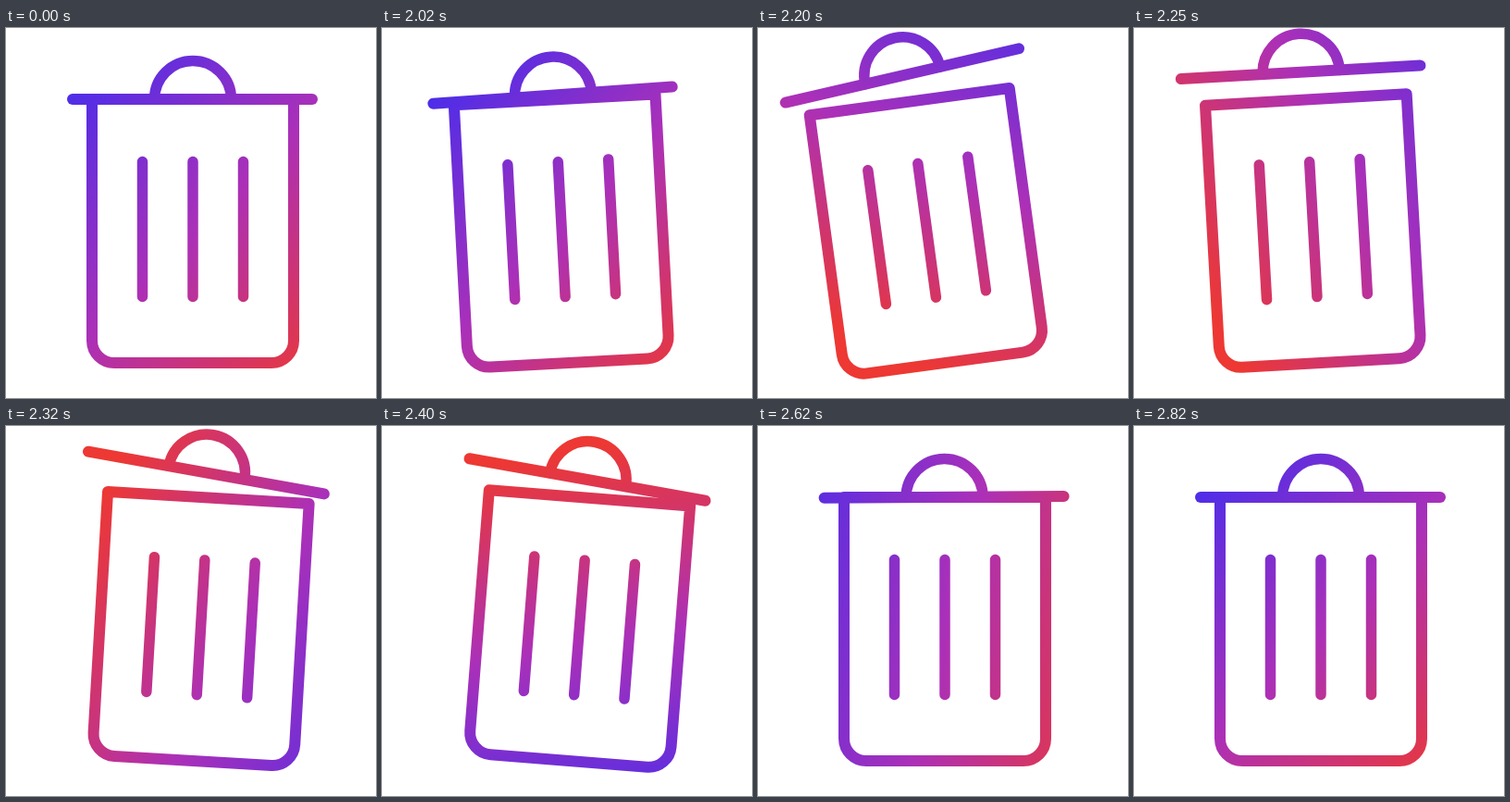
Animation of 400x400 px, one loop 2850 ms. Source, as an HTML page:

```html
<!DOCTYPE html>
<html lang="en">
<head>
<meta charset="utf-8">
<title>Bin</title>
<style>
  html, body { margin: 0; width: 100%; height: 100%; overflow: hidden; background: #fff; }
  svg { display: block; width: 100vw; height: 100vh; }
  mask { fill: none; stroke: #fff; stroke-width: 12; stroke-linecap: round; stroke-linejoin: round; }
  .thin { stroke-width: 11.5; }
</style>
</head>
<body>
<svg viewBox="0 0 400 400">
  <defs>
    <linearGradient id="paint" gradientUnits="userSpaceOnUse" x1="-210" y1="0" x2="210" y2="0">
      <stop offset="0" stop-color="#4a2dea"/>
      <stop offset=".5" stop-color="#ab30b8"/>
      <stop offset="1" stop-color="#ed3833"/>
    </linearGradient>
    <mask id="bin" maskUnits="userSpaceOnUse" x="0" y="0" width="400" height="400">
      <g id="body">
        <path d="M93 77H311V338A24 24 0 0 1 287 362H117A24 24 0 0 1 93 338Z"/>
        <path class="thin" d="M147.5 144.5V290.5M202 144.5V290.5M256.5 144.5V290.5"/>
        <g id="lid">
          <path d="M72 77H331"/>
          <path class="thin" d="M160.5 77A41.5 41.5 0 0 1 243.5 77"/>
        </g>
      </g>
    </mask>
  </defs>
  <rect width="400" height="400" fill="url(#paint)" mask="url(#bin)"/>
</svg>
<script>
  const LOOP = 2850, START = 2000;
  const [body, lid, paint] = ["body", "lid", "paint"].map(id => document.getElementById(id));

  const easeOut = s => Math.sin(s * Math.PI / 2);
  const easeInOut = s => (1 - Math.cos(s * Math.PI)) / 2;
  const earlyInOut = s => easeInOut(s ** 0.85);

  // 40 steps per second, start times cut to 10 ms
  const stepTime = ms => 25 * (Math.ceil((Math.floor(ms / 10) + 1) / 2.5) - 1);

  function draw(ms) {
    const t = stepTime(ms % LOOP) - START;
    // Goes from 0 to 1 between two times after START
    const ramp = (from, to, ease = easeInOut) =>
      ease(Math.min(1, Math.max(0, (t - from) / (to - from))));

    // The bin leans left, swings right and settles
    const tilt = -10 * ramp(0, 125, easeOut) + 15 * ramp(140, 375) - 5 * ramp(375, 500);

    // The lid jumps, rocks and drops back
    const lift = -30 * (ramp(0, 240, easeOut) - ramp(240, 640));
    const slide = -3.5 * (ramp(0, 100, easeOut) - ramp(500, 660));
    const rock = -8.8 * ramp(0, 120) + 16.5 * ramp(130, 360)
      - 11.2 * ramp(360, 500) + 3.5 * ramp(500, 660);

    // The colours make one turn, drifting towards blue on the way
    const turn = 45 + 360 * ramp(0, 800, earlyInOut);
    const drift = -75 * (ramp(90, 200) - ramp(200, 480));

    const sway = `rotate(${tilt} 202 362)`;
    body.setAttribute("transform", sway);
    lid.setAttribute("transform", `translate(${slide} ${lift}) rotate(${rock} 201.5 77)`);
    paint.setAttribute("gradientTransform",
      `${sway} translate(202 222) rotate(${turn}) translate(${drift} 0)`);
  }

  const start = performance.now();
  function tick() {
    draw(performance.now() - start);
    requestAnimationFrame(tick);
  }
  tick();
</script>
</body>
</html>
```
